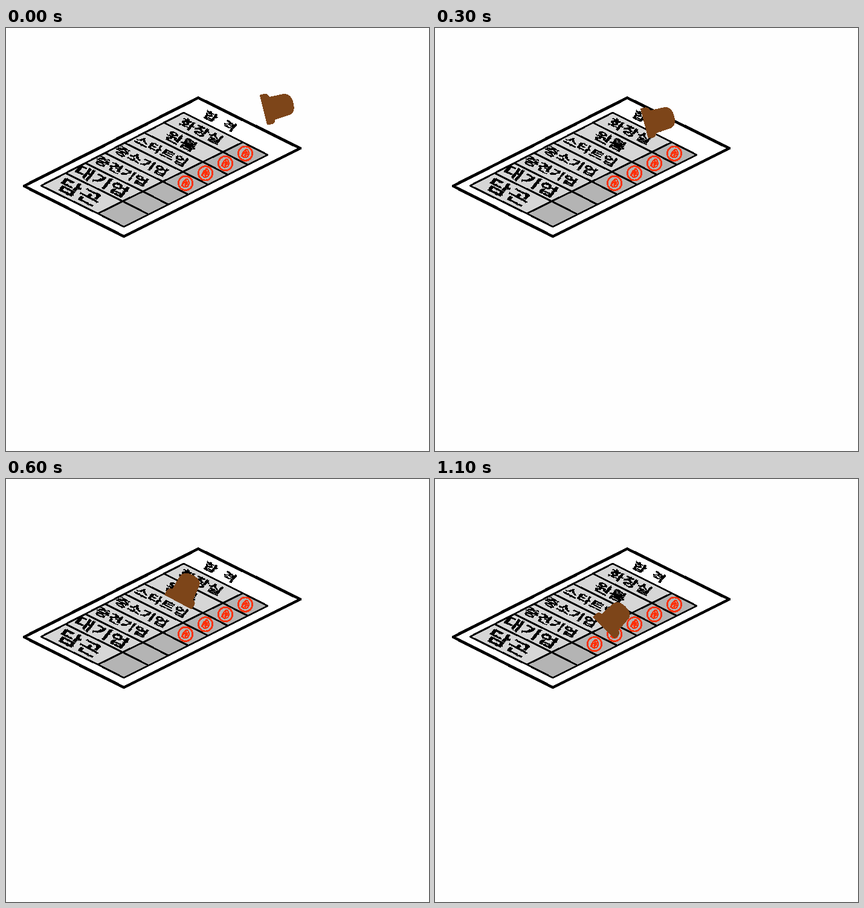
Write an HTML page that moves like this. It is 700 px wide and 700 px high and loops after 6100 ms.

```html
<!DOCTYPE html>
<html lang="ko">
<head>
<meta charset="utf-8">
<title>합격 도장</title>
<style>
  html, body { margin: 0; width: 100%; height: 100%; overflow: hidden; background: #fefefe; }
  svg { display: block; width: 100vw; height: 100vh; }
  text {
    font-family: "Noto Sans CJK KR", "Noto Sans CJK", sans-serif; font-weight: 700;
    text-anchor: middle; stroke: #000; stroke-width: .6;
  }
</style>
</head>
<body>
<svg viewBox="0 0 700 700">
  <defs>
    <!-- hand-drawn edge without smoothing -->
    <filter id="rough" x="-10%" y="-10%" width="120%" height="120%">
      <feTurbulence type="fractalNoise" baseFrequency=".22" numOctaves="2" seed="4" result="noise"/>
      <feDisplacementMap in="SourceGraphic" in2="noise" scale="3" xChannelSelector="R" yChannelSelector="G"/>
      <feComponentTransfer><feFuncA type="discrete" tableValues="0 1"/></feComponentTransfer>
    </filter>
    <g id="print" fill="none" stroke="#ff3008" stroke-linecap="round">
      <circle r="11.7" stroke-width="2.8"/>
      <path d="M-6 4Q-4-5 3-7Q8-1 4 5Q-3 9-5 3Q-2-3 3-2Q4 3-1 3M1-7L0 6" stroke-width="2.2"/>
    </g>
  </defs>
  <g id="card" stroke="#000" stroke-linejoin="round" shape-rendering="crispEdges"></g>
  <g id="labels" filter="url(#rough)"></g>
  <g id="prints" shape-rendering="crispEdges"></g>
  <path id="stamp" fill="#7d4519" shape-rendering="crispEdges"
    d="M-26 0V-8Q-25-14-19-15L-18-40Q-15-51 0-51Q16-51 18-41L20-15Q25-14 26-9L25 0Z"/>
</svg>
<script>
const NS = 'http://www.w3.org/2000/svg';
const $ = id => document.getElementById(id);
const mix = (a, b, t) => a.map((v, i) => v + (b[i] - v) * t);

function add(parent, tag, attrs, content = '') {
  const node = document.createElementNS(NS, tag);
  for (const key in attrs) node.setAttribute(key, attrs[key]);
  node.textContent = content;
  $(parent).append(node);
  return node;
}

const polygon = (points, fill, width) =>
  add('card', 'polygon', { points: points.join(' '), fill, 'stroke-width': width });

function label(text, [x, y], size) {
  add('labels', 'text', {
    transform: `matrix(.92 .46 -.45 .55 ${x} ${y})`, y: size * .37, 'font-size': size
  }, text);
}

const rows = ['화장실', '원룸', '스타트업', '중소기업', '중견기업', '대기업', '담곤'];
const STAMPED = 5;

// Column borders run from the far end to the near end; the nearest row is the deepest
const columns = [[[294, 140], [58, 261]], [[392, 189], [152, 307]], [[433, 210], [195, 329]]];
const depth = i => i < rows.length ? i * .138 : 1;
const corner = (col, i) => mix(...columns[col], depth(i));
const cell = (col, i) => [corner(col, i), corner(col + 1, i), corner(col + 1, i + 1), corner(col, i + 1)];
const inside = ([a, b, c, d], t) => mix(mix(a, d, .5), mix(b, c, .5), t);

polygon([[318, 115.5], [487, 199], [195, 345], [30, 261.5]], '#fff', 4.8);
label('합\u2002격', [354, 154], 24);
rows.forEach((text, i) => {
  polygon(cell(0, i), '#d6d6d6', 3);
  polygon(cell(1, i), '#b4b4b4', 3);
  label(text, inside(cell(0, i), .46), Math.min(27 + 2 * i, 100 / text.length));
});

let lastPrint;
for (let i = 0; i < STAMPED; i++) {
  const [x, y] = inside(cell(1, i), .5);
  lastPrint = add('prints', 'use', { href: '#print', x, y });
}

// Stamp path: slide in, swing upright, press down, lift off
const STEP = 100, LOOP = 6100;
const path = [
  { at: 0, pose: [426, 136, 76] },
  { at: 4, pose: [320, 166, 75] },
  { at: 6, pose: [285, 204, 28] },
  { at: 7, pose: [265, 240, 14] },
  { at: 9, pose: [262, 276, 0] },
  { at: 10, pose: [262, 292, 0] },
  { at: 11, pose: [279, 247, 45] }
];
const lift = path[path.length - 1].at;

function poseAt(step) {
  const next = Math.max(1, path.findIndex(key => key.at >= step));
  const a = path[next - 1], b = path[next];
  return mix(a.pose, b.pose, (step - a.at) / (b.at - a.at));
}

function draw(ms) {
  const step = Math.min(Math.floor(ms % LOOP / STEP), lift);
  const [x, y, tilt] = poseAt(step);
  $('stamp').setAttribute('transform', `translate(${x} ${y}) rotate(${tilt})`);
  lastPrint.setAttribute('visibility', step === lift ? 'visible' : 'hidden');
}

const start = performance.now();
function tick() {
  draw(performance.now() - start);
  requestAnimationFrame(tick);
}
tick();
</script>
</body>
</html>
```
